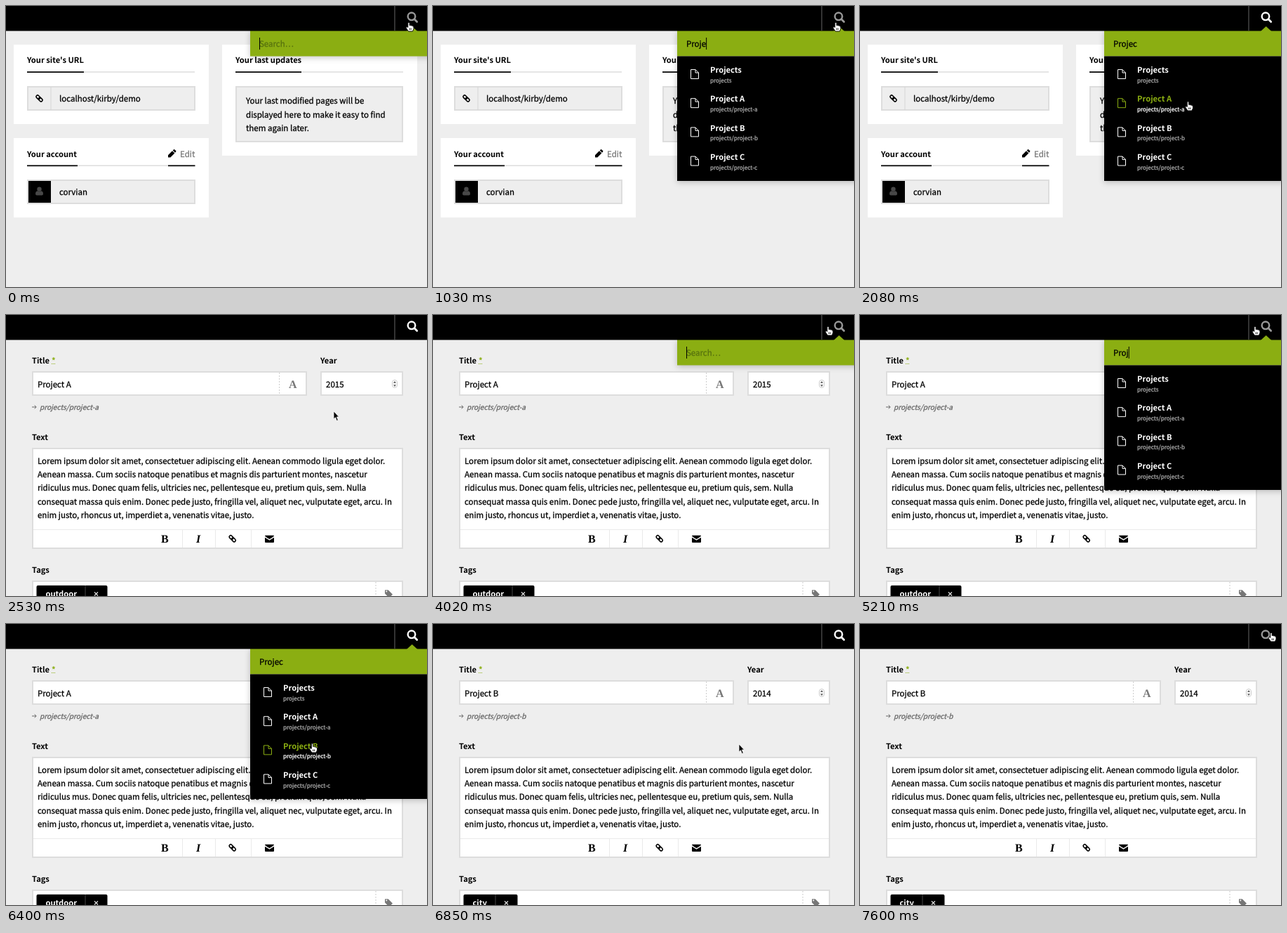
An HTML page that plays this animation: 600x400 px, repeating every 8 s.

```html
<!DOCTYPE html>
<html lang="en">
<head>
<meta charset="utf-8">
<title>Panel search</title>
<style>
html, body { margin: 0; width: 100%; height: 100%; overflow: hidden; background: #eee; }
svg { display: block; width: 600px; height: 400px; }
text {
  font: 11.5px "Noto Sans CJK JP", "Noto Sans CJK SC", "Noto Sans CJK", "Source Sans Pro", "Open Sans", sans-serif;
  text-rendering: geometricPrecision;
  white-space: pre;
  fill: currentColor;
  stroke: currentColor;
  stroke-width: .28px;
}
.bold { font-weight: 700; font-size: 11.15px; stroke: none; }
.small { font-size: 8.1px; color: #aaa; }
.path { font-size: 10.05px; font-style: italic; color: #666; }
.serif { font: bold 16px "Liberation Serif", "Noto Serif", serif; stroke: none; }
.italic { font-style: italic; }
.field { stroke: #ddd; stroke-width: 2; }
.dash { stroke: #ccc; stroke-dasharray: 2 2; }
.line { fill: none; stroke: currentColor; }
#menu { filter: drop-shadow(0 2px 4px rgba(0, 0, 0, .22)); }
.item { color: #fff; }
.item .name { color: inherit; }
.item.hover { color: #8bae12; }
.item.hover .small { color: #fff; }
</style>
</head>
<body>
<svg id="stage" viewBox="0 0 600 400"></svg>
<script>
const LOOP = 8000;
const GREEN = '#8bae12';

const text = (x, y, str, cls = '', color = '#000') =>
  `<text x="${x}" y="${y}" class="${cls}" color="${color}">${str}</text>`;
const rect = (x, y, w, h, fill, extra = '') =>
  `<rect x="${x}" y="${y}" width="${w}" height="${h}" fill="${fill}" ${extra}/>`;
const path = (d, fill = '#000', extra = '') => `<path d="${d}" fill="${fill}" ${extra}/>`;
const field = (x, y, w, h, fill = '#fff') => rect(x + 1, y + 1, w - 2, h - 2, fill, 'class="field"');
const dashed = (x, y, h) => path(`M${x + .5} ${y}v${h}`, 'none', 'class="dash"');
const chain = (x, y) =>
  `<g transform="translate(${x} ${y}) rotate(45) scale(.92)" fill="none" stroke="#000" stroke-width="1.7">
    <rect x="-6" y="-2.2" width="6.8" height="4.4" rx="2"/>
    <rect x="-.8" y="-2.2" width="6.8" height="4.4" rx="2"/></g>`;

function heading(x, y, str, mark) {
  return text(x, y, str, 'bold') + rect(x, y + 12, 239, 1.5, '#ddd') + rect(x, y + 12, mark, 1.7, '#000');
}

function dashboard() {
  const pencil = path('M231 215.6v-3.4l6-6 3.4 3.4-6 6zM237.7 205.5l1.2-1.1q.8-.7 1.6 0l1.6 1.6q.7.8 0 1.6l-1.1 1.2z');
  const user = '<circle cx="47.5" cy="260.8" r="3.2" fill="#484848"/>' +
    path('M42 267.5q0-4 3-4.3 2.5 2 5 0 3 .3 3 4.3 0 2-2 2h-7q-2 0-2-2z', '#484848');
  const note = ['Your last modified pages will be', 'displayed here to make it easy to find', 'them again later.'];
  return rect(11, 55, 278, 113, '#fff') + rect(11, 188, 278, 113, '#fff') + rect(308, 55, 278, 158, '#fff') +
    heading(30, 81.2, "Your site's URL", 81) +
    field(30, 114, 240, 35, '#eee') + rect(63.5, 115, 1, 33, '#d6d6d6') + chain(47.5, 131.5) +
    text(76, 136, 'localhost/kirby/demo') +
    heading(30, 214.5, 'Your account', 72) + rect(231, 226.5, 38.5, 1.7, '#000') + pencil +
    text(248, 214.5, 'Edit', '', '#777') +
    field(30, 247, 240, 35, '#eee') + rect(32, 249, 32, 31, '#000') + user +
    text(76, 269, 'corvian') +
    heading(327, 81.2, 'Your last updates', 94) +
    field(327, 114, 239, 80, '#eee') +
    note.map((str, i) => text(342, 139.3 + i * 19.3, str)).join('');
}

function editor({ letter, year, tag, tagWidth }) {
  const lorem = [
    'Lorem ipsum dolor sit amet, consectetuer adipiscing elit. Aenean commodo ligula eget dolor.',
    'Aenean massa. Cum sociis natoque penatibus et magnis dis parturient montes, nascetur',
    'ridiculus mus. Donec quam felis, ultricies nec, pellentesque eu, pretium quis, sem. Nulla',
    'consequat massa quis enim. Donec pede justo, fringilla vel, aliquet nec, vulputate eget, arcu. In',
    'enim justo, rhoncus ut, imperdiet a, venenatis vitae, justo.'
  ];
  const close = 43 + tagWidth - 15.5;
  return text(37, 68.7, 'Title', 'bold') + text(65, 68.7, '*', 'bold', GREEN) +
    path('M65 69.5h6', 'none', `stroke="${GREEN}" stroke-dasharray="1 1"`) +
    field(37, 80, 392, 35) + text(45, 102.7, 'Project ' + letter.toUpperCase()) +
    dashed(389, 82, 31) + text(403, 104, 'A', 'serif', '#777') +
    text(448, 68.7, 'Year', 'bold') + field(448, 80, 118, 35) + text(456, 102.7, year) +
    rect(550.5, 92.5, 7, 11, '#fff', 'rx="3.5" stroke="#ccc"') +
    path('M552 97l2-3 2 3zM552 99.2l2 3 2-3z', '#666') +
    path('M37 131h6M40.7 128.7l2.5 2.3-2.5 2.3', 'none', 'stroke="#666"') +
    text(48, 134.7, 'projects/project-' + letter, 'path') +
    text(37, 177.7, 'Text', 'bold') + field(37, 189, 529, 144) +
    lorem.map((str, i) => text(45, 211.8 + i * 19.25, str)).join('') +
    rect(39, 305, 525, 1, '#eaeaea') +
    [251, 298, 349].map(x => rect(x, 306, 1, 25, '#eaeaea')).join('') +
    text(221, 324, 'B', 'serif') + text(271, 324, 'I', 'serif italic') + chain(322.7, 318.3) +
    path('M369 314.5q0-.8 1-.8h11q1 0 1 .8 0 .8-6.5 4.6-6.5-3.8-6.5-4.6zM369 316.8l6.5 4 6.5-4v6.2q0 1-1 1h-11q-1 0-1-1z') +
    text(37, 367, 'Tags', 'bold') + field(37, 378, 529, 40) +
    rect(43.5, 385, tagWidth, 25, '#000', 'rx="2"') + text(56.5, 401, tag, 'bold', '#fff') +
    rect(close - 16, 385, 1, 20, '#444') +
    path(`M${close - 2.5} 394.5l5 5m0-5l-5 5`, 'none', 'stroke="#ddd" stroke-width="1.2"') +
    dashed(526.5, 380, 20) +
    path('M540 391.5h4.8l6.2 6.2-5 5-6-6.2zM541.3 393.6a1 1 0 1 0 2 0a1 1 0 1 0-2 0z', '#777', 'fill-rule="evenodd"');
}

function result(name, slug, i) {
  return `<g class="item" transform="translate(0 ${i * 41.2})">
    <path class="line" d="M367.5 90.5h6.5l4.5 4.5v8.5h-11zM374 90.5v4.5h4.5"/>
    ${text(395, 95.2, name, 'bold name')}${text(395, 109, slug, 'small')}</g>`;
}

const results = [['Projects', 'projects']].concat(
  ['a', 'b', 'c'].map(c => ['Project ' + c.toUpperCase(), 'projects/project-' + c]));

document.getElementById('stage').innerHTML =
  rect(0, 0, 600, 400, '#eee') +
  `<g id="dash">${dashboard()}</g>
  <g id="pageA">${editor({ letter: 'a', year: 2015, tag: 'outdoor', tagWidth: 101 })}</g>
  <g id="pageB">${editor({ letter: 'b', year: 2014, tag: 'city', tagWidth: 77 })}</g>
  <g id="menu">
    ${rect(348, 35, 262, 36.5, GREEN)}
    <g id="list">${rect(348, 71.5, 262, 177.5, '#000')}${results.map((r, i) => result(...r, i)).join('')}</g>
    <g id="placeholder">${text(361, 57.6, 'Search…', '', '#58730f')}</g>
    <text id="query" x="361" y="57.6"></text>
    ${rect(361, 45, 1, 17, '#000', 'id="caret"')}
  </g>
  ${rect(0, 0, 600, 35.5, '#000')}${rect(553.5, 0, 1, 35, '#666')}
  ${path('M571 36l7.7-7 7.7 7z', GREEN, 'id="notch"')}
  <g id="lens" fill="none"><circle cx="578" cy="14.8" r="5.3" stroke-width="2.4"/>
    <path d="M582 18.8l3.7 3.7" stroke-width="2.8" stroke-linecap="round"/></g>
  <g id="cursor" stroke-linejoin="round">
    <path id="hand" fill="#fff" stroke="#000" stroke-width=".9"
      d="M-1.2 7.5V1Q0-.8 1.2 1V4.6Q2.4 3.7 3.3 5Q4.5 4.2 5.3 5.6Q7 5.2 7 7V9.4L5.6 13H-.6L-3.6 8.4Q-4 6.6-2.6 6.6ZM1.2 8.5v2.5M3.2 8.5v2.5"/>
    <path id="arrow" fill="#000" stroke="#fff" stroke-width=".8"
      d="M-.5 1V12.2L2 9.8 3.8 14.6 5.8 13.7 3.9 9.1H7Z"/>
  </g>`;

// Each step: time, scene, pointer x, y, search text (null = closed), caret visible
const steps = [
  [0, 'dash', 574, 23, '', 1],
  [150, 'dash', 574, 23, '', 0],
  [600, 'dash', 574, 23, 'Pr', 1],
  [750, 'dash', 574, 23, 'Pro', 1],
  [900, 'dash', 574, 23, 'Proj', 1],
  [1030, 'dash', 574, 23, 'Proje', 1],
  [1180, 'dash', 574, 23, 'Projec', 1],
  [1630, 'dash', 556, 42, 'Projec', 0],
  [1780, 'dash', 515, 88, 'Projec', 0],
  [1930, 'dash', 478, 126, 'Projec', 0],
  [2080, 'dash', 467.5, 136, 'Projec', 0],
  [2530, 'pageA', 467.5, 136, null],
  [3430, 'pageA', 490, 106, null],
  [3580, 'pageA', 540, 44, null],
  [3720, 'pageA', 563, 16, null],
  [4020, 'pageA', 563, 16, '', 1],
  [4620, 'pageA', 563, 16, '', 0],
  [4920, 'pageA', 563, 16, 'Pr', 1],
  [5070, 'pageA', 563, 16, 'Pro', 1],
  [5210, 'pageA', 563, 16, 'Proj', 1],
  [5360, 'pageA', 563, 16, 'Projec', 1],
  [5810, 'pageA', 546, 40, 'Projec', 0],
  [5960, 'pageA', 505, 92, 'Projec', 0],
  [6100, 'pageA', 463, 140, 'Projec', 0],
  [6250, 'pageA', 442, 165, 'Projec', 0],
  [6400, 'pageA', 436.5, 170, 'Projec', 0],
  [6850, 'pageB', 436.5, 170, null],
  [7150, 'pageB', 462, 142, null],
  [7300, 'pageB', 522, 77, null],
  [7450, 'pageB', 570, 28, null],
  [7600, 'pageB', 586, 12, null]
];

const $ = id => document.getElementById(id);
const show = (id, on) => { $(id).style.display = on ? '' : 'none'; };
const items = [...document.querySelectorAll('.item')];

function render([, scene, x, y, query, caret]) {
  const open = query !== null;
  const listed = open && query.length > 2;
  const onLens = x > 554 && y < 35;
  const hovered = listed && y > 77 ? Math.floor((y - 77) / 41.2) : -1;
  const pointing = onLens || hovered >= 0;

  for (const id of ['dash', 'pageA', 'pageB']) show(id, id === scene);
  show('menu', open);
  show('notch', open);
  show('list', listed);
  show('placeholder', !query);
  show('caret', caret);
  $('query').textContent = query || '';
  $('caret').setAttribute('x', 361 + (query ? $('query').getComputedTextLength() : 0));
  items.forEach((el, i) => el.classList.toggle('hover', i === hovered));
  $('lens').setAttribute('stroke', onLens ? '#999' : '#fff');
  $('cursor').setAttribute('transform', `translate(${x} ${y})`);
  show('hand', pointing);
  show('arrow', !pointing);
}

let current;
const start = performance.now();
function tick() {
  const t = (performance.now() - start) % LOOP;
  const step = steps.findLast(s => s[0] <= t);
  if (step !== current) render(current = step);
  requestAnimationFrame(tick);
}
tick();
</script>
</body>
</html>
```
